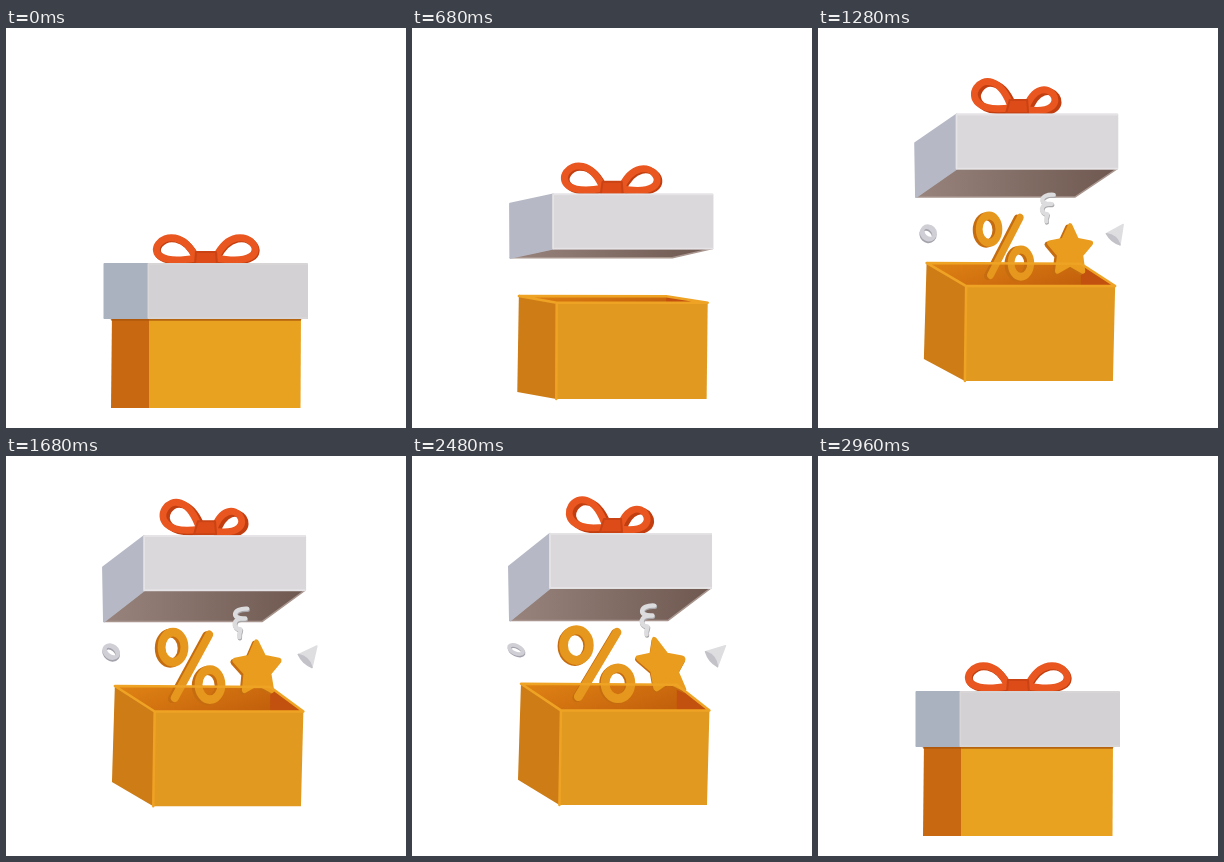
These frames come from a looping animation (400 px wide and 400 px high, 3360 ms). An HTML page:

```html
<!DOCTYPE html>
<html lang="en">
<head>
<meta charset="utf-8">
<title>Gift box</title>
<style>
  html, body { margin: 0; width: 100%; height: 100%; overflow: hidden; background: #fff; }
  svg { display: block; width: 100vw; height: 100vh; }
  path, ellipse, polygon { stroke-linejoin: round; stroke-linecap: round; }
</style>
</head>
<body>
<svg viewBox="0 0 400 400">
  <defs>
    <linearGradient id="inner" y2="0.4">
      <stop offset="0" stop-color="#e08414"/>
      <stop offset="1" stop-color="#c3600c"/>
    </linearGradient>
    <linearGradient id="under">
      <stop offset="0" stop-color="#98847d"/>
      <stop offset="1" stop-color="#6e5850"/>
    </linearGradient>
    <g id="percentShape" fill="none" stroke-width="9">
      <ellipse cx="-21" cy="-19" rx="13" ry="15.5"/>
      <path d="M20-32L-19 33"/>
      <ellipse cx="21" cy="19.5" rx="13" ry="15.5"/>
    </g>
    <path id="starShape" stroke-width="6"/>
    <path id="coil" d="M8-12C-7-13-9-1 6-2C-8-3-7 9 1 9C2 10-1 12 0 17"/>
  </defs>
  <g id="scene">
    <polygon id="underside" fill="url(#under)" stroke="#a8958e" stroke-width="1.5"/>
    <polygon id="rim" fill="url(#inner)"/>
    <polygon id="innerRight" fill="#c2500e"/>
    <g id="ring" fill="none" stroke-width="4">
      <ellipse rx="7.5" ry="4" cx="1" cy="1" stroke="#a4a3ad"/>
      <ellipse rx="7.5" ry="4" stroke="#d0cfd5"/>
    </g>
    <g id="cone" stroke-width="1.5">
      <path d="M10-10L-10-4Q-1 0 2 11Z" fill="#dedde0" stroke="#dedde0"/>
      <path d="M-10-4Q-7 6 2 11Q1 0-10-4Z" fill="#c3c2c9" stroke="#c3c2c9"/>
    </g>
    <g id="spiral" fill="none" stroke-width="4.5">
      <use href="#coil" x=".6" y="1.2" stroke="#a9a7aa"/>
      <use href="#coil" stroke="#dcdbdd"/>
    </g>
    <g id="percent">
      <use id="percentSide" href="#percentShape" stroke="#c46c0f"/>
      <use href="#percentShape" stroke="#e6971d"/>
    </g>
    <g id="star">
      <use id="starSide" href="#starShape" fill="#c46c0f" stroke="#c46c0f"/>
      <use href="#starShape" fill="#e99c1d" stroke="#e99c1d"/>
    </g>
    <polygon id="boxLeft"/>
    <polygon id="boxFront"/>
    <path id="rimLine" fill="none" stroke="#efa325" stroke-width="2.5"/>
    <path id="lidShadow" d="M106 291.5H294" stroke="#a9550c" stroke-width="2.5"/>
    <g id="bow" fill="none">
      <path id="bowSide" stroke="#c13e10" stroke-width="7"/>
      <path id="bowLoops" stroke="#e9561f" stroke-width="7"/>
      <path id="knot" fill="#dd4c18" stroke="#c94314" stroke-width="2"/>
    </g>
    <polygon id="lidLeft" stroke-width="2"/>
    <polygon id="lidFront" stroke-width="2"/>
    <path id="lidEdge" fill="none" stroke="#e9e7e8" stroke-width="1.6"/>
  </g>
</svg>
<script>
const LOOP = 3360, OPEN = 200, CLOSE = 2470;
const $ = id => document.getElementById(id);
const set = (id, attrs) => { for (const k in attrs) $(id).setAttribute(k, attrs[k]); };
const mix = (a, b, k) => a + (b - a) * k;
const mixAll = (a, b, k) => a.map((v, i) => mix(v, b[i], k));
const clamp = (v, lo = 0, hi = 1) => Math.min(hi, Math.max(lo, v));
const color = (a, b, k) => `rgb(${mixAll(a, b, k).map(Math.round)})`;
const points = (...list) => list.map(p => p.map(v => v.toFixed(2)).join()).join(" ");

// S-curve with a long tail that reaches one half after `half` ms.
function rise(elapsed, half, power) {
  const u = (Math.max(0, elapsed) / half) ** power;
  return u / (1 + u);
}
function remain(t, duration) {
  const u = clamp((t - CLOSE) / duration);
  return 1 - u * u * (3 - 2 * u);
}

set("starShape", { d: "M" + points(...Array.from({ length: 10 }, (_, i) => {
  const r = i % 2 ? 14 : 27, a = i * Math.PI / 5;
  return [r * Math.sin(a), -r * Math.cos(a)];
})) + "Z" });

function drawBox(tilt, lit, lift) {
  const at = (x0, y0, x1, y1) => mixAll([x0, y0], [x1, y1], tilt);
  const backLeft = at(106, 284, 109, 227), backRight = at(250, 284, 265, 228);
  const frontLeft = at(143, 283, 149, 254), frontRight = at(295, 283, 297.5, 254);
  const baseBack = at(105, 380, 106, 323), baseLeft = at(143, 380, 147.5, 348.5);
  const baseRight = at(294.5, 380, 295, 348.5);
  set("rim", { points: points(backLeft, backRight, frontRight, frontLeft) });
  set("innerRight", { points: points(backRight, frontRight, [backRight[0], frontRight[1]]) });
  set("boxLeft", { points: points(backLeft, frontLeft, baseLeft, baseBack),
    fill: color([200, 104, 16], [205, 124, 22], lit) });
  set("boxFront", { points: points(frontLeft, frontRight, baseRight, baseLeft),
    fill: color([232, 162, 32], [225, 153, 32], lit) });
  set("rimLine", { d: "M" + points(frontLeft, backLeft, backRight, frontRight, frontLeft, baseLeft), opacity: lit });
  set("lidShadow", { opacity: clamp(.8 - lift * 20) });
}

function drawLid(lift, tilt, lit) {
  const top = mix(236, 77, lift), bottom = top + 54, drop = 33 * tilt;
  const left = mix(142.5, 138, tilt), right = mix(301, 299, tilt);
  const back = mix(98.5, 97, tilt), backRight = mix(262, 256, tilt);
  const side = color([170, 177, 191], [182, 185, 197], lit);
  const front = color([211, 209, 211], [218, 216, 218], lit);
  set("lidLeft", { points: points([back, top + drop], [left, top], [left, bottom], [back + tilt, bottom + drop]),
    fill: side, stroke: side });
  set("lidFront", { points: points([left, top], [right, top], [right, bottom], [left, bottom]),
    fill: front, stroke: front });
  set("lidEdge", { d: "M" + points([right, top], [left, top], [left, bottom], [right, bottom]), opacity: .25 + .5 * lit });
  set("underside", { points: points([back + tilt, bottom + drop], [left, bottom], [right, bottom], [backRight, bottom + drop]) });
  drawBow(top, tilt);
}

// Each loop is one cubic that leaves the knot and returns to it.
function drawBow(y, tilt) {
  const loop = (shut, open) => {
    const [x0, y0, x1, y1, x2, y2] = mixAll(shut, open, tilt);
    return `M${x0} ${y0}c${x1} ${y1} ${x2} ${y2} 0 0`;
  };
  const d = loop([190, -6, -25, -52, -75, 14], [194, -7, -22, -66, -70, 10])
    + loop([209.5, -6, 25, -52, 75, 14], [207, -5, 16, -48, 54, 8]);
  set("bow", { transform: `translate(0 ${y})` });
  set("bowSide", { d, transform: `translate(${1 + 2.5 * tilt} ${1 + tilt})` });
  set("bowLoops", { d });
  set("knot", { d: `M${190 + 2 * tilt} ${-12 - 3 * tilt}h${20 - 3 * tilt}l1 13h-22Z` });
}

function drawItems(t) {
  const pop = rise(t - 680, 254, 2.85) * remain(t, 340);
  const age = clamp((t - 1280) / 1200, -.5, 1.2);
  const turn = clamp(mix(.86, 1, age));
  const size = Math.max(.3, 1.5 * pop - .5), mild = Math.max(.3, pop);
  const place = (id, x0, y0, x1, y1, rest) => set(id, {
    transform: `translate(${mix(x0, x1, pop)} ${mix(y0, y1, pop)}) ${rest}`,
    visibility: pop > .01 ? "visible" : "hidden"
  });
  place("percent", 210, 345, 185, 207, `scale(${size * turn} ${size})`);
  place("star", 265, 378, 251, 209.5, `skewX(${17 * Math.max(0, age) ** 2}) scale(${mild * .87} ${mild})`);
  place("ring", 190, 350, 103.5, 192.5, `rotate(${45 - 20 * age}) scale(${mild} ${mild * mix(1.5, .95, age)})`);
  place("cone", 230, 305, 304, 199, `rotate(${age * 12 - 12}) scale(${mild})`);
  place("spiral", 150, 385, 235, 160, `scale(${mild})`);
  const depth = 1.5 + (1 - turn) * 18;
  set("percentSide", { transform: `translate(${-depth} 1)` });
  set("starSide", { transform: `translate(${-depth * .8} 1.5)` });
}

function draw(t) {
  const left = remain(t, 490);
  const lift = rise(t - OPEN, 515, 3.7) * left;
  const tilt = rise(t - OPEN, 633, 3.4) * left;
  const lit = clamp(tilt * 3.6);
  const squash = Math.sin(Math.PI * clamp((t - OPEN) / 380));
  drawItems(t);
  drawBox(tilt, lit, lift);
  drawLid(lift, tilt, lit);
  set("scene", { transform: `translate(200 ${380 + 2 * squash}) scale(${1 + .02 * squash} ${1 - .015 * squash}) translate(-200 -380)` });
}

const start = performance.now();
function frame() {
  draw((performance.now() - start) % LOOP);
  requestAnimationFrame(frame);
}
frame();
</script>
</body>
</html>
```
